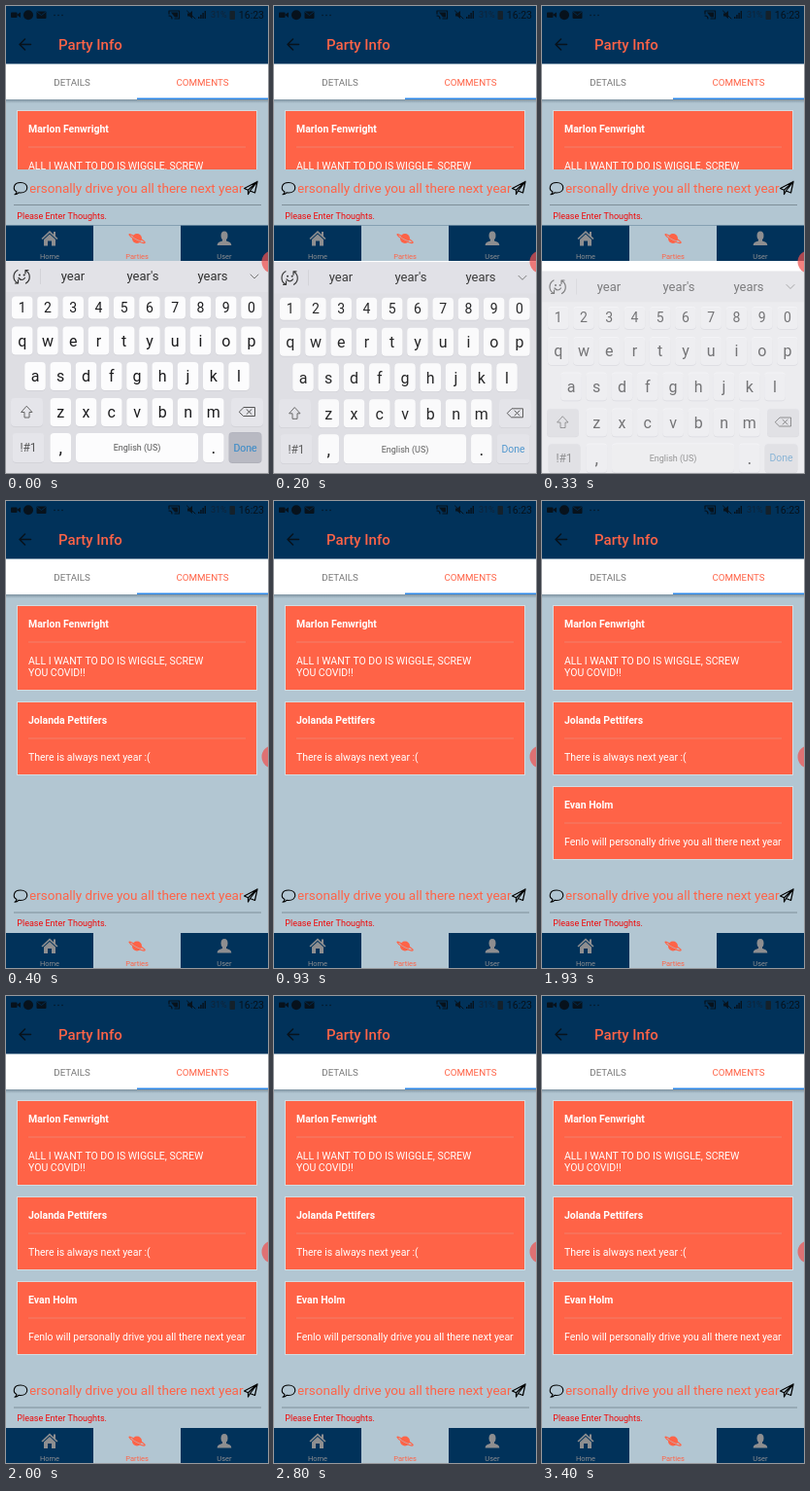
Write an HTML page with a canvas that moves like this. It is 270x480 px and loops after 3.99 s.

```html
<!DOCTYPE html>
<html lang="en">
<head>
<meta charset="utf-8">
<title>Party Info</title>
<style>
html, body { margin: 0; width: 100%; height: 100%; overflow: hidden; background: #fff; }
canvas { display: block; width: 270px; height: 480px; }
</style>
</head>
<body>
<canvas id="stage" width="270" height="480"></canvas>
<script>
const ctx = document.getElementById('stage').getContext('2d');
const LOOP = 3990, KEYBOARD_GONE = 400, POSTED = 1870;
const NAVY = '#01325a', STEEL = '#b2c6d2', TOMATO = '#ff6347', INK = '#07121c', IDLE = '#8e8e90';
const REPLY = 'Fenlo will personally drive you all there next year';

// y is the middle of the capital letters
function text(str, x, y, size, color, { weight = 400, align = 'left' } = {}) {
  ctx.font = `${weight} ${size}px Roboto, sans-serif`;
  ctx.fillStyle = color;
  ctx.textAlign = align;
  ctx.fillText(str, x, y + size * 0.355);
}

function rect(x, y, w, h, color) {
  ctx.fillStyle = color;
  ctx.fillRect(x, y, w, h);
}

function rounded(x, y, w, h, r, color) {
  ctx.fillStyle = color;
  ctx.beginPath();
  ctx.roundRect(x, y, w, h, r);
  ctx.fill();
}

function disc(x, y, r, color) {
  ctx.fillStyle = color;
  ctx.beginPath();
  ctx.arc(x, y, r, 0, Math.PI * 2);
  ctx.fill();
}

function stroke(path, color, width = 1) {
  ctx.strokeStyle = color;
  ctx.lineWidth = width;
  ctx.lineJoin = ctx.lineCap = 'round';
  ctx.stroke(new Path2D(path));
}

function fill(path, color) {
  ctx.fillStyle = color;
  ctx.fill(new Path2D(path));
}

function at(x, y, draw) {
  ctx.save();
  ctx.translate(x, y);
  draw();
  ctx.restore();
}

function statusBar() {
  rounded(5, 6.5, 6.5, 5.5, 1, INK);
  fill('M11 9 L15 6.5 V12 Z', INK);
  disc(23, 9.2, 5, INK);
  rounded(31.5, 5.5, 10, 7.5, 1, INK);
  stroke('M32.5 6.5 L36.5 9.5 L40.5 6.5', NAVY, 0.8);
  for (const x of [50, 54, 58]) disc(x, 9.5, 0.7, INK);
  stroke('M168 8 V5 H178.5 V13 H174 M168 10 A3 3 0 0 1 171 13', INK, 1.2);
  fill('M170 6.5 H177 V11.5 H174 Z', INK);
  fill('M187 7.5 H189 L192 5 V13 L189 10.5 H187 Z', INK);
  stroke('M186.5 5 L195 13', INK);
  for (let i = 0; i < 4; i++) rect(198 + i * 2.2, 11 - i * 2, 1.4, 2 + i * 2, INK);
  text('31%', 211, 9, 9, '#102438');
  rounded(230.5, 5, 5.5, 9, 1, '#14212b');
  text('16:23', 266, 9.2, 10.5, INK, { align: 'right' });
}

function header() {
  rect(0, 0, 270, 60, NAVY);
  statusBar();
  stroke('M25.5 39.5 H14 M19.5 34 L14 39.5 L19.5 45', INK, 1.5);
  text('Party Info', 54, 39.5, 15, TOMATO, { weight: 500 });

  const shade = ctx.createLinearGradient(0, 96, 0, 100);
  shade.addColorStop(0, 'rgba(50,70,85,.4)');
  shade.addColorStop(1, 'rgba(50,70,85,0)');
  rect(0, 96, 270, 4, shade);
  rect(0, 59.5, 270, 36.5, '#fff');
  text('DETAILS', 68, 78.5, 9.75, '#757575', { align: 'center' });
  text('COMMENTS', 202.5, 78.5, 9.75, TOMATO, { align: 'center' });
  rect(135, 94.5, 135, 1.5, '#2d87e8');
}

function card(y, h, name, lines) {
  rect(11, y, 248, h + 1, '#d3dbe0');
  rect(12, y + 1, 246, h - 1, TOMATO);
  text(name, 23, y + 19.5, 10.5, '#fff', { weight: 700 });
  rect(23, y + 37.5, 224, 1, '#f2806c');
  lines.forEach((line, i) => text(line, 23, y + 57 + i * 12.5, 10.5, '#fff'));
}

function comments(bottom, posted) {
  ctx.save();
  ctx.beginPath();
  ctx.rect(0, 96, 270, bottom - 96);
  ctx.clip();
  card(107, 87, 'Marlon Fenwright', ['ALL I WANT TO DO IS WIGGLE, SCREW', 'YOU COVID!!']);
  card(206, 75, 'Jolanda Pettifers', ['There is always next year :(']);
  if (posted) card(293, 75, 'Evan Holm', [REPLY]);
  ctx.restore();
}

function tabBar() {
  rect(0, 0, 270, 37, NAVY);
  rect(90, 0, 90, 37, STEEL);
  at(45, 13.5, () => {
    fill('M0 -8 L8.5 0 L7.3 1 L0 -5.7 L-7.3 1 L-8.5 0 Z M4 -7 H6 V-2 L4 -4 Z', IDLE);
    fill('M0 -4.5 L6 1 V7.5 H2 V2.5 H-2 V7.5 H-6 V1 Z', IDLE);
  });
  at(135, 13.5, () => {
    disc(0, 0, 5, TOMATO);
    stroke('M-4.2 -3 C-11 -7 -8 -2 0 2 C8 6 11 5 4.8 1', TOMATO, 1.2);
    stroke('M-5 -1.7 C-2 0.6 2 2.6 5 3', STEEL, 0.6);
  });
  at(225, 13.5, () => {
    ctx.fillStyle = IDLE;
    ctx.beginPath();
    ctx.ellipse(0, -3, 3.5, 4.5, 0, 0, Math.PI * 2);
    ctx.fill();
    fill('M-2 0 H2 V2.5 C5 3.5 7.3 4 7.3 7 H-7.3 C-7.3 4 -5 3.5 -2 2.5 Z', IDLE);
  });
  ['Home', 'Parties', 'User'].forEach((label, i) =>
    text(label, 45 + i * 90, 31.5, 7.5, i === 1 ? TOMATO : IDLE, { align: 'center' }));
}

// Input row, error line and tab bar move together
function footer(y) {
  at(0, y, () => {
    ctx.save();
    ctx.beginPath();
    ctx.rect(25, -12, 220, 24);
    ctx.clip();
    text(REPLY, 244.5, 0, 13.5, TOMATO, { align: 'right' });
    ctx.restore();
    stroke('M11 4 C6.5 1.5 7.5 -5.5 15 -5.5 C24 -5.5 24 5 15 5 L13 4.8 C12 6 10.5 6.7 9 6.8 Q11 5.5 11 4 Z', '#000', 1.1);
    stroke('M259 -6.5 L256.5 5 L251.5 3 L249.5 6.5 V2.2 L245.5 0.5 Z L249.5 2.2 M259 -6.5 L251.5 3', '#000', 1.2);
    rect(8, 17, 255, 1, '#7f8f99');
    text('Please Enter Thoughts.', 11.3, 28.5, 9, '#f00808');
    at(0, 38.5, tabBar);
  });
}

function key(label, x, y, w, h, { size = 16, bg = '#fcfcfd', color = '#1c1c1e' } = {}) {
  rounded(x - w / 2, y - h / 2 + 0.7, w, h, 4, '#cfcfd5');
  rounded(x - w / 2, y - h / 2, w, h, 4, bg);
  text(label, x, y, size, color, { align: 'center' });
}

function keyRow(chars, x, y, h, size) {
  [...chars].forEach((c, i) => key(c, x + i * 26.25, y, 21.5, h, { size }));
}

function keyboard(pressed) {
  const soft = '#e5e5ea', blue = '#4a94cc';
  rect(0, 262, 270, 218, '#dedee3');
  rect(0, 262, 270, 32, '#e2e2e7');
  rect(35, 270, 1, 16, '#d3d3d8');
  stroke('M12 271.5 A7.5 7.5 0 0 0 11.5 284.5 M20.5 285 A7.5 7.5 0 0 0 20.5 272 M20 275 V271.5 H23 M12.5 281.5 V285 H9.5 M13 279.5 Q16.3 283.5 19.5 279.5', '#333', 1.2);
  disc(14, 276.5, 1, '#333');
  disc(18.7, 276.5, 1, '#333');
  ['year', "year's", 'years'].forEach((word, i) =>
    text(word, 69 + i * 72, 277.5, 13, '#303030', { align: 'center' }));
  stroke('M252 276 L256 280 L260 276', '#777', 1);

  keyRow('1234567890', 16.7, 310, 23, 14);
  keyRow('qwertyuiop', 16.7, 344, 29, 16);
  keyRow('asdfghjkl', 30, 380.5, 29, 16);
  keyRow('zxcvbnm', 56.3, 417.5, 29, 16);
  key('', 21.5, 417.5, 33, 29, { bg: soft });
  stroke('M21.5 411.5 L27 417.5 H24 V423 H19 V417.5 H16 Z', '#666', 1);
  key('', 248.5, 417.5, 33, 29, { bg: soft });
  stroke('M240.5 417 L245 412.5 H256.5 V421.5 H245 Z M248 414.7 L253 419.5 M253 414.7 L248 419.5', '#555', 1);

  key('!#1', 23, 454, 33, 30, { size: 12, bg: soft, color: '#555' });
  key(',', 56.3, 454, 21.5, 30, { size: 18 });
  key('English (US)', 135, 454, 126, 30, { size: 9, color: '#555' });
  key('.', 213.8, 454, 21.5, 30, { size: 18 });
  key('Done', 246.5, 454, 34, 30, { size: 10.5, bg: soft, color: blue });
  if (pressed > 0) {
    rounded(229.5, 438, 34, 32, 4, `rgba(140,142,155,${0.5 * pressed})`);
    text('Done', 246.5, 454, 10.5, blue, { align: 'center' });
  }
}

function keyboardLayer(t) {
  const leave = Math.min(1, Math.max(0, (t - 130) / 200)) ** 2;
  rect(0, 262, 270, 218, '#fff');
  ctx.save();
  ctx.globalAlpha = 1 - 0.42 * leave;
  ctx.translate(0, 10.5 * leave);
  keyboard(t < 70 ? 1 : Math.max(0, 1 - (t - 40) / 130));
  ctx.restore();
}

function render(t) {
  const typing = t < KEYBOARD_GONE;
  rect(0, 0, 270, 480, STEEL);
  comments(typing ? 168 : 387, t >= POSTED);
  header();
  footer(typing ? 187 : 405.5);
  if (typing) keyboardLayer(t);
  disc(275, 263, 11.5, 'rgba(238,80,78,.72)');
}

const start = performance.now();
function frame() {
  render((performance.now() - start) % LOOP);
  requestAnimationFrame(frame);
}
frame();
</script>
</body>
</html>
```
